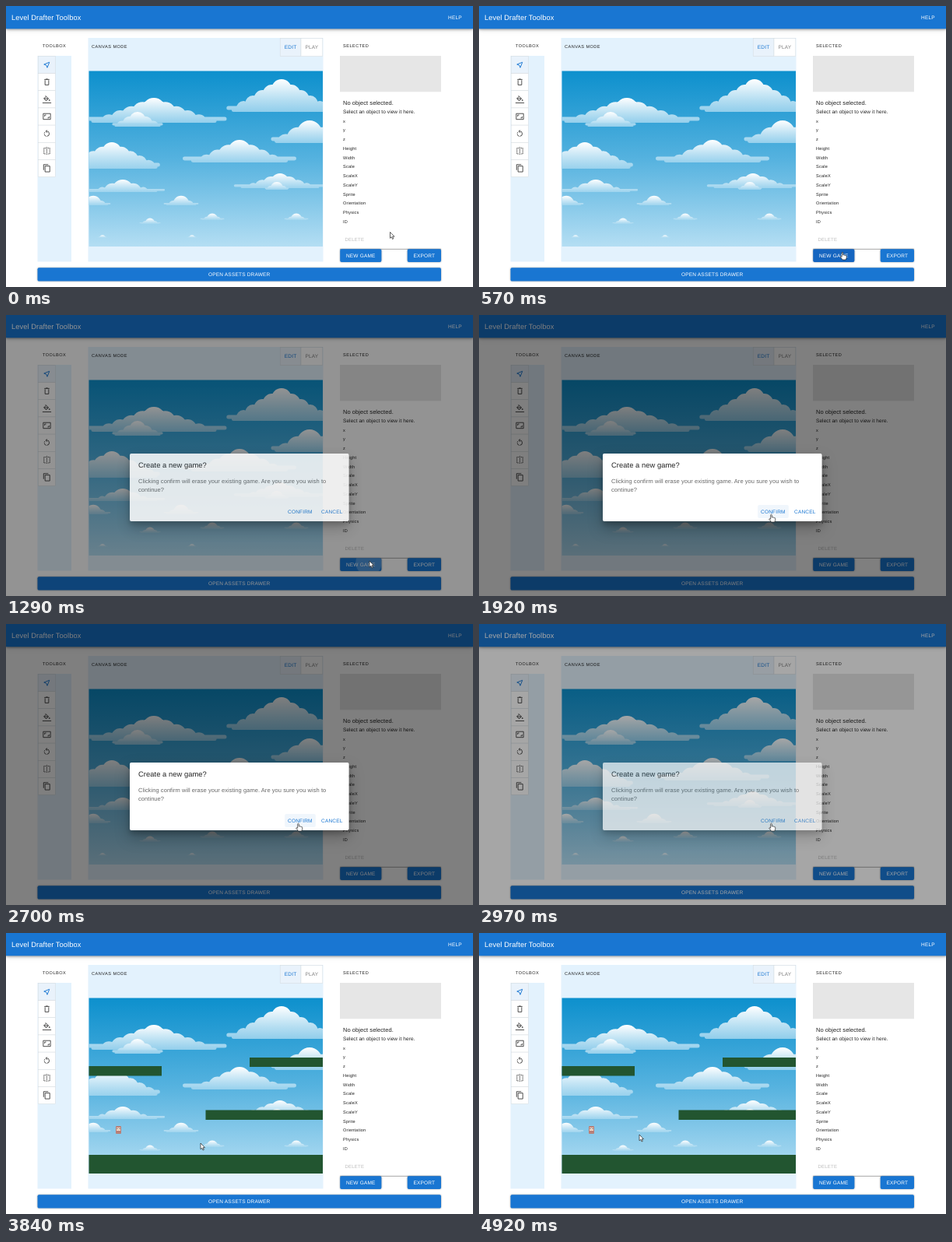
Animation of 600x361 px, one loop 4.95 s. Source, as an HTML page:

```html
<!DOCTYPE html>
<html lang="en">
<head>
<meta charset="utf-8">
<title>Game editor</title>
<style>
  html, body { margin: 0; width: 100%; height: 100%; overflow: hidden; background: #fff; }
  svg { display: block; width: 600px; height: 361px; font-family: "Liberation Sans", Arial, sans-serif; }
  text { white-space: pre; text-rendering: geometricPrecision; }
  .mid { text-anchor: middle; }
  .bar { filter: drop-shadow(0 1px 1.5px rgba(0,0,0,.32)) drop-shadow(0 1px 3px rgba(0,0,0,.14)); }
  .btn { filter: drop-shadow(0 .9px .9px rgba(0,0,0,.34)); }
  .paper { filter: drop-shadow(0 .4px .6px rgba(0,0,0,.22)); }
  .modal { filter: drop-shadow(0 4px 3px rgba(0,0,0,.2)) drop-shadow(0 8px 9px rgba(0,0,0,.25)); }
</style>
</head>
<body>
<svg id="stage" viewBox="0 0 600 361"></svg>
<script>
const LOOP = 4950, STEP = 30;
const UNIT = .467; // the page is shown at this zoom
const BLUE = '#1976d2', DARK_BLUE = '#1565c0', PALE = '#e3f2fd', TINT = '#e9f2fb', INK = '#212121', TURF = '#225530';
const VIEW = { x: 106.5, y: 83.5, w: 300.5, h: 225.5 };

const rect = (x, y, w, h, fill, more = '') =>
  `<rect x="${x}" y="${y}" width="${w}" height="${h}" fill="${fill}" ${more}/>`;

// Type styles: size in page pixels, letter spacing in em
const TYPE = {
  title: [20, .0075], body: [16, .0094], small: [14, .0107], button: [14, .0286],
  mini: [13, .0286], caption: [12, .0333], overline: [12, .0833]
};
const text = (x, y, str, type, fill = INK, more = '') => {
  const [size, gap] = TYPE[type];
  return `<text x="${x}" y="${y}" font-size="${size * UNIT}" letter-spacing="${gap}em" fill="${fill}" ${more}>${str}</text>`;
};
const label = (x, y, w, h, str, fill) => text(x + w / 2, y + h / 2 + 2.35, str, 'button', fill, 'class="mid"');
const button = (x, y, w, h, str, id = '') =>
  rect(x, y, w, h, BLUE, `rx="1.9" class="btn" id="${id}"`) + label(x, y, w, h, str, '#fff');
const cell = (x, y, w, h, on) =>
  rect(x, y, w, h, on ? TINT : '#fff', 'stroke="#d3d9de" stroke-width=".5"');

// Round-topped columns, tallest in the middle, on two flat bars
function cloud(cx, base, w, h, reach = .22) {
  const n = Math.max(3, Math.round(w / 14)) | 1;
  let d = '';
  for (let i = 0; i < n; i++) {
    const k = 2 * (i + .5) / n - 1;
    const tall = h * (1 - .75 * Math.abs(k)), r = Math.min(tall, w / n * (1.05 - .35 * Math.abs(k)));
    const x = cx + k * w / 2;
    d += `M${x - r} ${base}V${base - tall + r}A${r} ${r} 0 0 1 ${x + r} ${base - tall + r}V${base}Z`;
  }
  const t = Math.min(5, h * .17);
  for (const [half, y] of [[w * (.5 + reach), base - 1.5 * t], [w * (.5 + reach / 2), base - t]])
    d += `M${cx - half} ${y}h${2 * half}a${t / 2} ${t / 2} 0 0 1 0 ${t}h${-2 * half}a${t / 2} ${t / 2} 0 0 1 0 ${-t}Z`;
  return `<path d="${d}" fill="url(#puff)"/>`;
}

// Far clouds shrink towards the horizon
function puff(cx, base) {
  const w = 4 + .5 * (VIEW.y + VIEW.h - base);
  return cloud(cx, base, w, w * .4, .2);
}

const sky = () => rect(VIEW.x, VIEW.y, VIEW.w, VIEW.h, 'url(#sky)') + `<g clip-path="url(#view)">` +
  cloud(354, 136, 110, 42, .12) + cloud(190, 150, 130, 32, .2) + cloud(169, 155, 50, 19, .12) +
  cloud(390, 176, 76, 29, .12) + cloud(136, 209, 106, 34, .06) + cloud(300, 201, 98, 29) +
  cloud(150, 239, 66, 16, .3) + cloud(352, 234, 80, 19) + cloud(348, 236, 24, 10, .1) +
  puff(112, 256) + puff(225, 256) + puff(265, 275) + puff(373, 275) + puff(185, 280) +
  puff(124, 298) + puff(239, 298) + `</g>`;

const hero = () => rect(141, 248, 7, 10, '#b98078', 'rx="1"') + rect(142, 250, 5, 4, '#f3d9c9') +
  rect(142.5, 251, 1, 1, '#333') + rect(145.5, 251, 1, 1, '#333');

const level = () => rect(VIEW.x, 171, 93.5, 12.5, TURF) + rect(313, 160, 94, 12, TURF) +
  rect(256.5, 227.5, 150.5, 12.5, TURF) + rect(VIEW.x, 285, VIEW.w, 24, TURF) + hero();

const ICONS = [
  'M19 5L4 11 10.6 13.4 13 20Z',
  'M7 7V20H17V7M5 5H19M9.5 4H14.5',
  'M8 2L16 10 10 16 4 10 10 4M4 10H16L10 16ZM19 13L18 15.5H20ZM0 22H24',
  'M2 4H22V20H2ZM6 12V8H10M18 12V16H14',
  'M11 5A7 7 0 0 1 12 19M12 2L9 5.5 12.5 9M10 19A7 7 0 0 1 5 13M5 11A7 7 0 0 1 7 7.5',
  'M9 4H4V20H9M12 1V23M15 4H20V20H15',
  'M3 17V2H16M7 6H20V22H7Z'
];
const toolbox = () => rect(40.5, 64, 43.5, 264.5, PALE) + ICONS.map((d, i) => {
  const side = 22.15, y = 64.5 + i * side, on = i === 0;
  const dash = i === 5 ? 'stroke-dasharray="3 1.5"' : '';
  return cell(41.2, y, side, side, on) +
    `<path transform="translate(46.9 ${y + 5.4}) scale(${UNIT})" d="${d}" fill="none" stroke="${on ? BLUE : '#444'}" stroke-width="2" ${dash}/>`;
}).join('');

const FIELDS = 'x y z Height Width Scale ScaleX ScaleY Sprite Orientation Physics ID'.split(' ');

const details = () => rect(429, 41, 130, 271.3, '#fff', 'class="paper"') +
  text(433, 53.4, 'SELECTED', 'overline') + rect(429, 64, 130, 46.3, '#e6e6e6') +
  text(433, 126.7, 'No object selected.', 'body') + text(433, 138, 'Select an object to view it here.', 'small') +
  FIELDS.map((f, i) => text(433, 149.6 + i * 11.74, f, 'caption')).join('') +
  text(435.5, 302.4, 'DELETE', 'mini', '#bdbdbd') + rect(429, 311.9, 130, .7, '#8a8a8a');

const page = () => rect(0, 0, 600, 361, '#fff') + rect(0, 0, 600, 29.3, BLUE, 'class="bar"') +
  text(7, 17.7, 'Level Drafter Toolbox', 'title', '#fff') + text(568, 17, 'HELP', 'button', '#fff') +
  text(47, 53.4, 'TOOLBOX', 'overline') + toolbox() +
  rect(105.5, 41, 302, 287.5, PALE) + text(110, 54, 'CANVAS MODE', 'overline') +
  cell(352.2, 41.6, 26.8, 23, true) + label(352.2, 41.6, 26.8, 23, 'EDIT', BLUE) +
  cell(379, 41.6, 27.8, 23) + label(379, 41.6, 27.8, 23, 'PLAY', '#808080') +
  sky() + `<g id="level">${level()}</g>` + details() +
  button(429.2, 312.2, 53.2, 16.8, 'NEW GAME', 'fresh') +
  `<circle id="ripple" cx="466" cy="318" fill="#fff" clip-path="url(#freshClip)"/>` +
  button(515.7, 312.2, 43.3, 16.8, 'EXPORT') +
  button(40.5, 336.3, 518.5, 17.3, 'OPEN ASSETS DRAWER');

const dialog = () => rect(159, 178, 281.6, 87, '#fff', 'rx="1.9" class="modal"') +
  text(170, 196, 'Create a new game?', 'title') +
  text(170, 215.6, 'Clicking confirm will erase your existing game. Are you sure you wish to', 'body', '#666') +
  text(170, 226.8, 'continue?', 'body', '#666') +
  rect(358.2, 244, 39.6, 17, '#f0f6fc', 'rx="1.9" id="hover"') +
  text(362, 254.8, 'CONFIRM', 'button', BLUE) + text(405, 254.8, 'CANCEL', 'button', BLUE);

const stop = (at, color, a = 1) => `<stop offset="${at}" stop-color="${color}" stop-opacity="${a}"/>`;
document.getElementById('stage').innerHTML = `<defs>
  <linearGradient id="sky" x2="0" y2="1">${stop(0, '#0d90cd')}${stop(.5, '#55b2df')}${stop(1, '#b4def3')}</linearGradient>
  <linearGradient id="puff" x2="0" y2="1">${stop(0, '#fff')}${stop(1, '#a3d6ef', .85)}</linearGradient>
  <clipPath id="view">${rect(VIEW.x, VIEW.y, VIEW.w, VIEW.h, '#000')}</clipPath>
  <clipPath id="freshClip">${rect(429.2, 312.2, 53.2, 16.8, '#000', 'rx="1.9"')}</clipPath>
  </defs>${page()}
  ${rect(0, 0, 600, 361, '#000', 'id="shade"')}
  <g id="dialog">${dialog()}</g>
  <g id="cursor" stroke="#222" stroke-width=".7" fill="#fff" stroke-linejoin="round">
    <path id="arrow" d="M0 0V7.8L1.8 6.2 3 9 4.3 8.4 3.1 5.7H5.5Z"/>
    <path id="hand" d="M-.8 .8Q0-.4 .8.8V4Q2 3.4 2.4 4.2 3.5 3.7 3.9 4.6 5 4.2 5.2 5.4V7.6L4.3 10H0L-2.8 6.2Q-2.6 5-.8 6.2Z"/>
  </g>`;

const el = id => document.getElementById(id);
const set = (id, name, value) => el(id).setAttribute(name, value);
const show = (id, on) => set(id, 'visibility', on ? 'inherit' : 'hidden');
const clamp = v => Math.min(1, Math.max(0, v));
const smooth = p => p * p * (3 - 2 * p);

// cubic-bezier(.4, 0, .2, 1)
function ease(p) {
  p = clamp(p);
  let lo = 0, hi = 1, u = p;
  for (let i = 0; i < 20; i++) {
    u = (lo + hi) / 2;
    const x = 1.2 * u * (1 - u) ** 2 + .6 * u * u * (1 - u) + u ** 3;
    if (x < p) lo = u; else hi = u;
  }
  return smooth(u);
}

const PRESS = 1110, OPEN = 1162, CLOSE = 2916, RESET = 3060;
const HOME = [493.5, 290.5];
const MOVES = [ // each glide: from, until, target
  { from: 30, until: 510, to: [467, 316] },
  { from: 1380, until: 1890, to: [375.5, 256] },
  { from: 3420, until: 3840, to: [250, 270] },
  { from: 4770, until: 4920, to: [206, 259] }
];

const pointer = t => MOVES.reduce((at, { from, until, to }) => {
  const k = smooth(clamp((t - from) / (until - from)));
  return at.map((v, i) => v + (to[i] - v) * k);
}, HOME);

function draw(t) {
  const [x, y] = pointer(t);
  const modal = ease((t - OPEN) / 225) - ease((t - CLOSE) / 195);
  const onFresh = t < OPEN && x < 482.4 && y > 312;
  const onConfirm = modal > 0 && x > 358 && x < 398 && y > 244 && y < 261;

  set('shade', 'opacity', modal * .5);
  set('dialog', 'opacity', modal);
  show('dialog', modal > 0);
  show('hover', onConfirm && t < CLOSE);
  show('level', t >= RESET);

  set('fresh', 'fill', onFresh ? DARK_BLUE : BLUE);
  const age = t - PRESS;
  show('ripple', age >= 0 && age < 600);
  set('ripple', 'r', 38 * ease(age / 550));
  set('ripple', 'opacity', .25 * (1 - clamp((age - 120) / 480)));

  show('hand', onFresh || onConfirm);
  show('arrow', !onFresh && !onConfirm);
  set('cursor', 'transform', `translate(${x.toFixed(2)} ${y.toFixed(2)})`);
}

const start = performance.now();
function tick() {
  const t = (performance.now() - start) % LOOP;
  draw(Math.floor(t / STEP) * STEP);
  requestAnimationFrame(tick);
}
tick();
</script>
</body>
</html>
```
